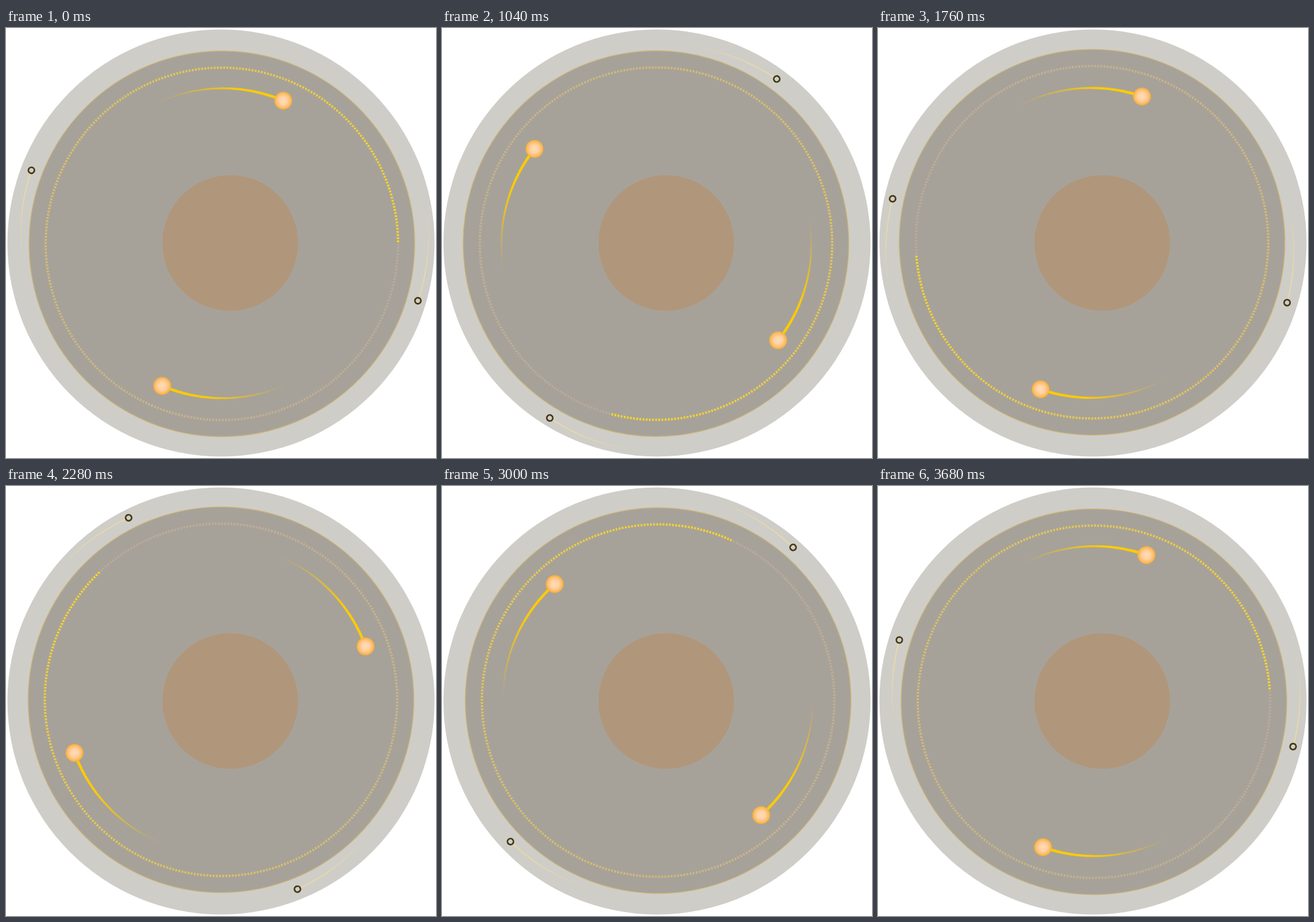
Write an HTML page that moves like this. It is 748 by 748 pixels and loops after 3.72 s.

```html
<!DOCTYPE html>
<html lang="en">
<head>
<meta charset="utf-8">
<title>Orbit loader</title>
<style>
html, body { margin: 0; width: 100%; height: 100%; overflow: hidden; background: #fff; }
svg { display: block; width: 100vw; height: 100vh; }
</style>
</head>
<body>
<svg viewBox="0 0 748 748">
  <defs>
    <radialGradient id="glow">
      <stop offset="0" stop-color="#ffdcb4"/>
      <stop offset="0.45" stop-color="#ffd2a2"/>
      <stop offset="0.72" stop-color="#ffbe78"/>
      <stop offset="0.9" stop-color="#f9b540"/>
      <stop offset="1" stop-color="#f0b030" stop-opacity="0.3"/>
    </radialGradient>
  </defs>
  <circle cx="374" cy="374" r="371.5" fill="#cfcdc8"/>
  <g id="spin"></g>
  <circle cx="390" cy="374" r="118" fill="#b0977b"/>
</svg>
<script>
const LOOP = 3720, STEP = 40, RAD = Math.PI / 180;
const spin = document.getElementById('spin');

function add(tag, attrs) {
  const el = document.createElementNS('http://www.w3.org/2000/svg', tag);
  for (const key in attrs) el.setAttribute(key, attrs[key]);
  return spin.appendChild(el);
}

const polar = (c, r, deg) => [c[0] + r * Math.cos(deg * RAD), c[1] + r * Math.sin(deg * RAD)];
const mix = (a, b, u) => a + (b - a) * u;

function arc(c, r, from, to, attrs) {
  const [x1, y1] = polar(c, r, from), [x2, y2] = polar(c, r, to);
  add('path', { d: `M${x1} ${y1}A${r} ${r} 0 0 1 ${x2} ${y2}`, fill: 'none', ...attrs });
}

// A tail that thins and fades backwards from the head angle.
function tail(c, r, head, span, color, width, alpha) {
  const n = 36, d = span / n;
  for (let i = 0; i < n; i++) {
    const u = 1 - i / n;
    arc(c, r, head - (i + 1) * d, head - i * d, {
      stroke: color,
      'stroke-width': mix(1.5, width, u),
      'stroke-opacity': alpha * Math.min(1, u * 1.5)
    });
  }
}

// Everything turns rigidly about the origin; parts sit slightly off axis.
const discMid = polar([0, 0], 2.1, 110);
const cometMid = polar([0, 0], 3, 75);
const outerMid = polar([0, 0], 14.5, 3);

add('circle', { cx: discMid[0], cy: discMid[1], r: 335.5, fill: '#a7a299',
  stroke: '#cdb878', 'stroke-width': 1.4 });

const DASHES = 350;
for (let i = 0; i < DASHES; i++) {
  const u = i / DASHES, head = 66.5 - u * 360;
  const color = [mix(248, 214, u), mix(214, 184, u), mix(40, 166, u)].map(Math.round);
  arc(discMid, 306.5, head - 0.6, head, {
    stroke: `rgb(${color})`,
    'stroke-width': 4,
    'stroke-opacity': mix(1, 0.35, u)
  });
}

for (const side of [0, 180]) {
  tail(cometMid, 269.5, side, 47, '#fc0', 5, 1);
  const [x, y] = polar(cometMid, 269.5, side);
  add('circle', { cx: x, cy: y, r: 16, fill: 'url(#glow)' });

  const angle = 85.65 + side;
  tail(outerMid, 354.8, angle, 26, '#eedd9c', 2, 0.8);
  const [px, py] = polar(outerMid, 354.8, angle);
  add('circle', { cx: px, cy: py, r: 5.2, fill: '#cfcdc8', stroke: '#44370f', 'stroke-width': 2.8 });
}

// Time in ms and angle in degrees: the turn slows gently through the loop.
const turn = [[0, -67], [640, -1.5], [1440, 77.8], [1760, 109.1], [2280, 159.9],
  [3000, 228.2], [3680, 289.5], [3720, 293]];

function angleAt(t) {
  const i = turn.findIndex(k => k[0] > t);
  const [t0, a0] = turn[i - 1], [t1, a1] = turn[i];
  return mix(a0, a1, (t - t0) / (t1 - t0));
}

function draw(ms) {
  const t = Math.floor(((ms + 1) % LOOP) / STEP) * STEP;
  spin.setAttribute('transform', `translate(374 374) rotate(${angleAt(t)})`);
}

const start = performance.now();
function tick() {
  draw(performance.now() - start);
  requestAnimationFrame(tick);
}
draw(0);
requestAnimationFrame(tick);
</script>
</body>
</html>
```
